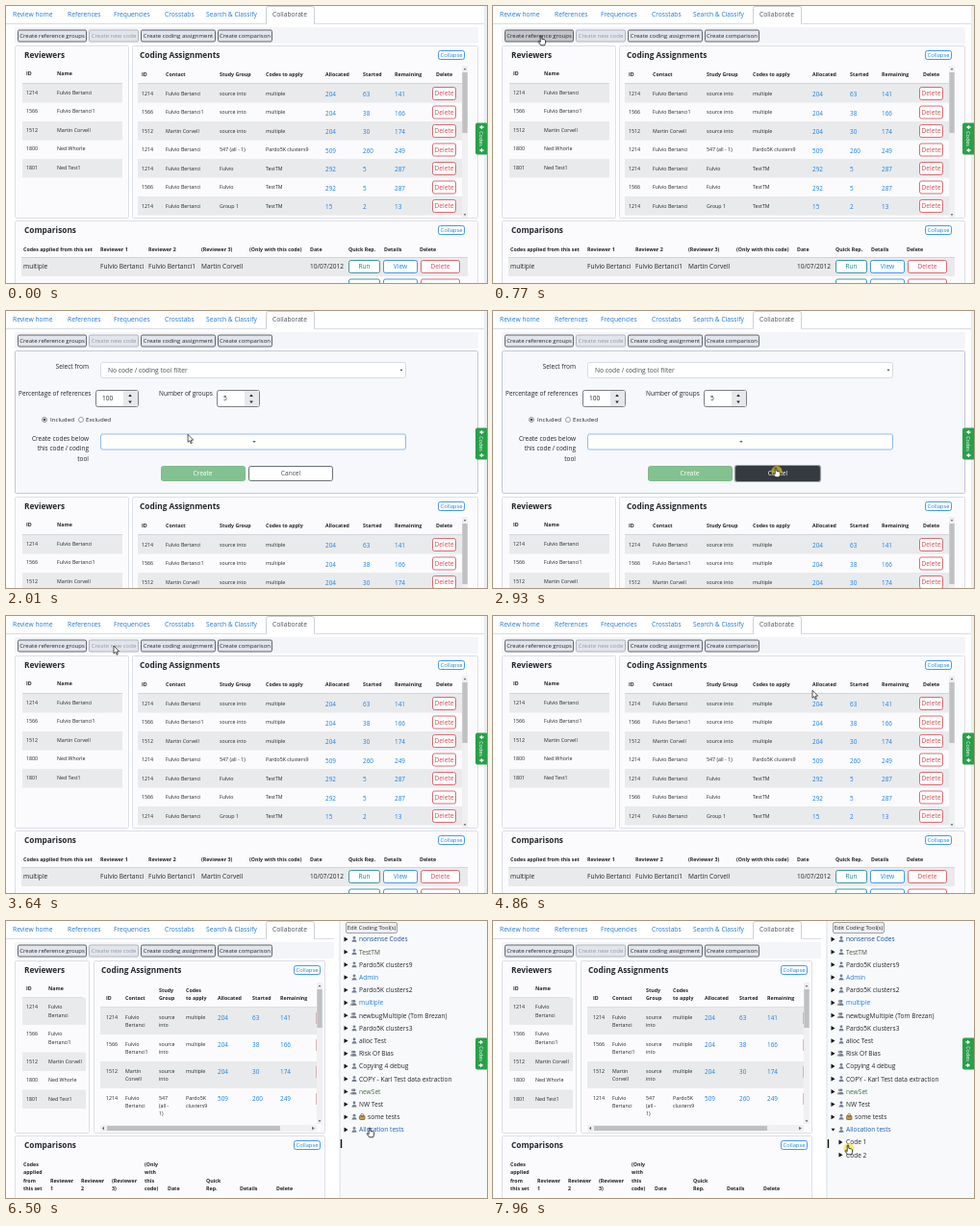
Recreate the animation shown at these times as an HTML page with a canvas. Size 500x288 px, loop 8000 ms.

```html
<!DOCTYPE html>
<html lang="en">
<head>
<meta charset="utf-8">
<title>Collaborate</title>
<style>
html, body { margin: 0; width: 100%; height: 100%; overflow: hidden; background: #fff; }
canvas { display: block; width: 500px; height: 288px; }
</style>
</head>
<body>
<canvas id="stage"></canvas>
<script>
const W = 500, H = 288, LOOP = 8000;
const canvas = document.getElementById('stage');
const dpr = window.devicePixelRatio || 1;
canvas.width = W * dpr;
canvas.height = H * dpr;
const ctx = canvas.getContext('2d');

const FONT = '"Open Sans", "Noto Sans", sans-serif';
const INK = '#212529', BLUE = '#1a80e0', RED = '#d04a52', GREY = '#8b9096';
const LINE = '#d5d9e2', STRIPE = '#e9eaec', CARD = '#fbfbfd';
const ANN = 'Fulvio Bertanci', ANN1 = ANN + '1', BEN = 'Martin Corvell';
const FIRST = 'Fulvio', SOFT = 'Pardo5K clusters';

// ---------- helpers ----------
// y is the middle of the capitals
function txt(s, x, y, size = 6.6, color = INK, bold = false, align = 'left') {
  ctx.save();
  ctx.translate(x, y + size * 0.35);
  ctx.scale(0.1, 0.1);
  ctx.font = `${bold ? 700 : 400} ${size * 10}px ${FONT}`;
  ctx.textAlign = align;
  ctx.fillStyle = color;
  ctx.fillText(s, 0, 0);
  ctx.restore();
}

function lines(s, x, y, gap, ...style) {
  s.split('\n').forEach((part, i) => txt(part, x, y + i * gap, ...style));
}

function rect(x, y, w, h, fill) {
  ctx.fillStyle = fill;
  ctx.fillRect(x, y, w, h);
}

function box(x, y, w, h, fill, stroke, r = 0, lw = 0.8) {
  ctx.beginPath();
  ctx.roundRect(x + 0.5, y + 0.5, w - 1, h - 1, r);
  if (fill) { ctx.fillStyle = fill; ctx.fill(); }
  if (stroke) { ctx.strokeStyle = stroke; ctx.lineWidth = lw; ctx.stroke(); }
}

function poly(points, fill, stroke, lw = 0.8) {
  ctx.beginPath();
  points.forEach(([x, y]) => ctx.lineTo(x, y));
  ctx.closePath();
  if (fill) { ctx.fillStyle = fill; ctx.fill(); }
  if (stroke) { ctx.strokeStyle = stroke; ctx.lineWidth = lw; ctx.lineJoin = 'round'; ctx.stroke(); }
}

function disc(x, y, r, fill, stroke) {
  ctx.beginPath();
  ctx.arc(x, y, r, 0, Math.PI * 2);
  if (fill) { ctx.fillStyle = fill; ctx.fill(); }
  if (stroke) { ctx.strokeStyle = stroke; ctx.lineWidth = 0.7; ctx.stroke(); }
}

function button(s, x, y, w, h, color, size = 6.6) {
  box(x, y, w, h, '#fff', color, 2);
  txt(s, x + w / 2, y + h / 2, size, color, false, 'center');
}

function arrow(x, y, r, dir, color) {
  if (dir === 'right') poly([[x - r, y - r * 1.2], [x + r, y], [x - r, y + r * 1.2]], color);
  else {
    const d = dir === 'up' ? -1 : 1;
    poly([[x - r, y - d * r * 0.6], [x + r, y - d * r * 0.6], [x, y + d * r * 0.8]], color);
  }
}

const between = (t, a, b) => t >= a && t < b;
const clamp = v => Math.max(0, Math.min(1, v));

// ---------- page head ----------
function header(t) {
  const tabs = [['Review home', 7], ['References', 64], ['Frequencies', 112], ['Crosstabs', 165], ['Search & Classify', 208]];
  rect(0, 18, 497, 0.8, '#cfd4da');
  tabs.forEach(([s, x]) => txt(s, x, 9, 6.7, '#1d78cf'));
  box(270, 0, 51, 23, '#fff', '#bfc5cc', 2);
  rect(269, 18.8, 53, 6, '#fff');
  txt('Collaborate', 277, 9, 6.7, '#495057');

  rect(9, 22, t >= 5330 ? 332 : 482, 17, '#f4f5f8');
  const hover = between(t, 530, 1860);
  const tools = [['Create reference groups', 12, 72], ['Create new code', 86, 52], ['Create coding assignment', 140, 78], ['Create comparison', 220, 57]];
  tools.forEach(([s, x, w], i) => {
    const off = i === 1;
    box(x, 24.5, w, 13, i === 0 && hover ? '#c3c5ca' : '#e3e5ed', off ? '#a4a8af' : '#41464d', 1.5);
    txt(s, x + w / 2, 31, 6, off ? '#9297a0' : INK, false, 'center');
  });
}

function card(x, y, w, h, title, tx) {
  box(x, y, w, h, CARD, LINE, 1);
  txt(title, tx, y + 10, 8.3, INK, true);
}

const collapse = (x, y) => button('Collapse', x, y, 28, 10, BLUE, 5.8);

function scrollY(x, y, h, thumb) {
  rect(x, y, 6, h, '#f0f0f1');
  arrow(x + 3, y + 3.5, 1.4, 'up', '#555');
  arrow(x + 3, y + h - 3, 1.4, 'down', '#555');
  rect(x + 0.3, y + 7, 5.4, thumb, '#bfc0c2');
}

// ---------- wide tables ----------
const people = [['1214', ANN], ['1566', ANN1], ['1512', BEN], ['1800', 'Ned Whorle'], ['1801', 'Ned Test1']];
const jobs = [
  ['1214', ANN, 'source into', 'multiple', 204, 63, 141],
  ['1566', ANN1, 'source into', 'multiple', 204, 38, 166],
  ['1512', BEN, 'source into', 'multiple', 204, 30, 174],
  ['1214', ANN, '547 (all - 1)', SOFT + '9', 509, 260, 249],
  ['1214', ANN, FIRST, 'TestTM', 292, 5, 287],
  ['1566', ANN, FIRST, 'TestTM', 292, 5, 287],
  ['1214', ANN, 'Group 1', 'TestTM', 15, 2, 13]
];
const heads = ['ID', 'Contact', 'Study Group', 'Codes to apply', 'Allocated', 'Started', 'Remaining', 'Delete'];

function wideTables() {
  const row = 19.5, top = 81;
  card(9, 41, 119, 180, 'Reviewers', 19);
  txt('ID', 21, 70, 5.3, INK, true);
  txt('Name', 53, 70, 5.3, INK, true);
  rect(17, 80, 104, 0.9, '#cfd3d9');
  people.forEach(([id, name], i) => {
    if (i % 2 === 0) rect(17, top + i * row, 104, row, STRIPE);
    txt(id, 21, 90 + i * row, 5.3);
    txt(name, 53, 90 + i * row, 5.3);
  });

  card(131, 41, 360, 180, 'Coding Assignments', 139);
  collapse(449, 46);
  const cols = [141, 166, 222, 270, 332, 371, 404, 447];
  heads.forEach((s, i) => txt(s, cols[i], 71, 5.3, INK, true));
  rect(137, 80, 337, 0.9, '#cfd3d9');
  jobs.forEach((job, r) => {
    const y = 91 + r * row;
    if (r % 2 === 0) rect(137, top + r * row, 337, row, STRIPE);
    job.forEach((v, c) => txt(String(v), cols[c], y + (c > 3 ? 1.2 : 0), c > 3 ? 6.4 : 5.3, c > 3 ? BLUE : INK));
    button('Delete', 443, y - 7, 25, 14, RED);
  });
  scrollY(474, 62, 158, 63);
}

function wideComparisons() {
  card(9, 223, 482, 90, 'Comparisons', 19);
  collapse(449, 228);
  const cols = [['Codes applied from this set', 18], ['Reviewer 1', 98], ['Reviewer 2', 148], ['(Reviewer 3)', 203],
    ['(Only with this code)', 253], ['Date', 316], ['Quick Rep.', 356], ['Details', 393], ['Delete', 430]];
  cols.forEach(([s, x]) => txt(s, x, 253, 5.3, INK, true));
  rect(16, 261, 464, 0.9, '#cfd3d9');
  rect(16, 262, 464, 19, STRIPE);
  [['multiple', 18], [ANN, 98], [ANN1, 148], [BEN, 203], ['10/07/2012', 316]].forEach(([s, x]) => {
    txt(s, x, 271, 6.6);
    txt(s, x, 290.5, 6.6);
  });
  [264, 283.5].forEach(y => {
    button('Run', 356, y, 33, 14, '#14808a');
    button('View', 392, y, 36, 14, BLUE);
    button('Delete', 431, y, 41, 14, RED);
  });
}

// ---------- form ----------
function field(label, lx, x, value) {
  txt(label, lx, 86, 6.5);
  box(x, 82, 45, 18, '#fff', '#5a6068', 2);
  txt(value, x + 7, 91, 6.6);
  rect(x + 29, 83, 15, 16, '#e6e8eb');
  arrow(x + 36, 88, 1.8, 'up', '#222');
  arrow(x + 36, 94.5, 1.8, 'down', '#222');
}

function form(t) {
  box(9, 41, 482, 149, '#f6f8fb', '#b4bccb', 1);
  txt('Select from', 86, 58, 6.5, INK, false, 'right');
  box(98, 53, 318, 17, '#fff', between(t, 1860, 2010) ? '#8fbdf0' : '#ced4da', 2);
  txt('No code / coding tool filter', 106, 61.5, 6.7, '#495057');
  arrow(411, 61.5, 1.4, 'down', '#333');

  field('Percentage of references', 13, 93, '100');
  field('Number of groups', 159, 219, '5');

  disc(40, 113, 2.5, '#fff', '#666');
  disc(40, 113, 1.3, '#444');
  txt('Included', 46, 113, 6.2);
  disc(78, 113, 2.5, '#fff', '#777');
  txt('Excluded', 83, 113, 6.2);

  lines('Create codes below\nthis code / coding\ntool', 86, 133, 10.2, 6.5, INK, false, 'right');
  box(98, 127.5, 318, 17, '#fff', '#74abe2', 2);
  arrow(258, 136, 1.6, 'down', '#2d6fb5');

  box(161, 161, 88, 16, '#83c28f', '#6fae7b', 2);
  txt('Create', 204.5, 169, 6.6, '#fff', false, 'center');
  button('Cancel', 252, 161, 88, 16, '#4a5057');
  ctx.save();
  ctx.globalAlpha = clamp((t - 2400) / 150);
  box(251, 160, 90, 18, '#343a40', '#9a9ea3', 2.5, 1.2);
  txt('Cancel', 296, 169, 6.6, '#fff', false, 'center');
  ctx.restore();
}

// ---------- narrow tables ----------
function narrowTables() {
  const twoLine = s => s.replace(' ', '\n');
  card(9, 41, 78, 180, 'Reviewers', 19);
  txt('ID', 21, 70, 5.3, INK, true);
  txt('Name', 44, 70, 5.3, INK, true);
  rect(17, 79.3, 63, 0.9, '#cfd3d9');
  const tops = [80, 108, 136.5, 156, 175.5, 195];
  people.forEach(([id, name], i) => {
    const y = tops[i];
    if (i % 2 === 0) rect(17, y, 66, tops[i + 1] - y, STRIPE);
    txt(id, 21, y + 9.5, 5.3);
    lines(i < 2 ? twoLine(name) : name, 44, y + 9.5, 8.4, 5.3);
  });

  card(91, 41, 241, 180, 'Coding Assignments', 99);
  collapse(299, 46);
  const cols = [104, 124, 159, 187, 220, 256, 285];
  cols.forEach((x, i) => {
    const two = i === 2 || i === 3;
    lines(two ? twoLine(heads[i]) : heads[i], x, two ? 72 : 80, 8, 5.3, INK, true);
  });
  rect(98, 89.3, 225, 0.9, '#cfd3d9');
  jobs.slice(0, 4).forEach((job, r) => {
    const y = 90 + r * 28;
    if (r % 2 === 0) rect(98, y, 225, 28, STRIPE);
    job.forEach((v, c) => {
      let s = String(v);
      if (c === 2 && r === 3) s = '547\n(all -\n1)';
      else if (c > 0 && c < 4) s = twoLine(s);
      lines(s, cols[c], y + (c > 3 ? 10.5 : 9.7), 8.2, c > 3 ? 6.4 : 5.3, c > 3 ? BLUE : INK);
    });
    rect(322, y + 5, 0.8, 12, '#d9a2a6');
  });
  scrollY(323, 64, 147, 40);
  rect(98, 212, 225, 7, '#f0f0f1');
  rect(105, 213, 180, 5, '#bfc0c2');
  poly([[102, 213.5], [102, 217.5], [100, 215.5]], '#666');
  arrow(319.5, 215.5, 1.4, 'right', '#666');

  card(9, 223, 323, 90, 'Comparisons', 19);
  collapse(299, 228);
  const comp = [['Codes\napplied\nfrom\nthis set', 18], ['Reviewer\n1', 46], ['Reviewer\n2', 78], ['(Reviewer\n3)', 110],
    ['(Only\nwith\nthis\ncode)', 144], ['Date', 168], ['Quick\nRep.', 208], ['Details', 243], ['Delete', 281]];
  comp.forEach(([s, x]) => lines(s, x, 278.5 - (s.split('\n').length - 1) * 8.5, 8.5, 5.3, INK, true));
}

// ---------- code tree ----------
const tree = [
  ['nonsense Codes', '#1d4d8f'], ['TestTM', '#4a5238'], [SOFT + '9'], ['Admin', BLUE], [SOFT + '2'],
  ['multiple', BLUE, 2], ['newbugMultiple (Tom Brezan)', INK, 2], [SOFT + '3'], ['alloc Test'],
  ['Risk Of Bias', INK, 2], ['Copying 4 debug'], ['COPY - Karl Test data extraction'],
  ['newSet', '#3b7440', 2], ['NW Test'], ['some tests'], ['Allocation tests', BLUE]
];

function person(x, y, color) {
  disc(x, y - 1.6, 1.4, color);
  ctx.beginPath();
  ctx.arc(x, y + 2.8, 2.5, Math.PI, 0);
  ctx.fill();
}

function sidebar(t) {
  const open = t >= 7280;
  rect(341, 0, 159, H, '#fff');
  rect(347, 0, 153, H, '#f8f9fb');
  rect(346.6, 0, 0.8, H, '#d3d7de');
  box(353, 1, 54, 12, '#eeeff1', '#8a8f96', 1.5);
  txt('Edit Coding Tool(s)', 380, 7, 5.9, INK, false, 'center');
  tree.forEach(([s, color = INK, heads = 1], i) => {
    const y = 19 + i * 13.2, last = i === tree.length - 1, boxed = s === 'some tests';
    arrow(353.5, y, 2, last && open ? 'down' : 'right', '#111');
    if (heads === 2) person(360.2, y, '#a59a9a');
    person(362, y, '#6f7d92');
    if (boxed) {
      box(367, y - 1.8, 6.5, 5, '#c79b4d', '#7d6231', 0.8);
      disc(370.2, y - 1.8, 1.6, null, '#7d6231');
    }
    txt(s, boxed ? 376 : 367, y, 6.6, last && t >= 6500 ? '#1a5fb4' : color);
  });
  if (open) ['Code 1', 'Code 2'].forEach((s, i) => {
    arrow(361.5, 230 + i * 13.2, 2, 'right', '#111');
    txt(s, 367, 230 + i * 13.2, 6.6);
  });
  rect(347.8, 227, 1.4, 9, '#111');
}

function codesTab(t) {
  const hover = between(t, 4950, 5720);
  box(487.5, 121, 14, 34, hover ? '#1e7e34' : '#28a04a', null, 2);
  ctx.save();
  ctx.translate(494, 138);
  ctx.rotate(Math.PI / 2);
  txt('Codes', 0, 0, 5.4, '#fff', false, 'center');
  const dir = t >= 5330 ? -1 : 1;
  [-12, 12].forEach(x => {
    poly([[x - 2.2, dir], [x + 2.2, dir], [x, -dir * 2.2]].map(([a, b]) => [a, b * -1]), '#fff');
    rect(x - 0.7, dir > 0 ? -2.6 : 0.4, 1.4, 2.2, '#fff');
  });
  ctx.restore();
}

// ---------- pointer ----------
// start, end, steps, path
const moves = [
  [70, 610, 8, [[420, 300], [300, 190], [120, 70], [50, 31]]],
  [1780, 2090, 5, [[50, 31], [150, 105], [282, 184]]],
  [2240, 2550, 5, [[282, 184], [294, 163]]],
  [3010, 3640, 9, [[294, 163], [200, 92], [112, 31]]],
  [4480, 5100, 9, [[112, 31], [300, 64], [493, 144]]],
  [5640, 6420, 11, [[493, 144], [440, 70], [392, 43], [362, 90], [366, 150], [371, 202]]],
  [6500, 6820, 5, [[378, 215], [364, 217], [350, 218]]],
  [7580, 7885, 5, [[350, 218], [369, 233]]]
];
const clicks = [[1080, 1240], [2860, 3010], [5180, 5330], [6970, 7120], [7955, 8000]];
const hands = [[770, 1860], [2400, 3080], [4950, 5720], [6500, 8000]];

function pointerAt(t) {
  const move = moves.filter(m => t >= m[0]).pop();
  if (!move) return null;
  const [start, end, n, path] = move;
  const step = Math.min(n, Math.floor((t - start) / ((end - start) / (n - 1)) + 0.01) + 1);
  // the tree visit begins with the pointer already on the row
  const q = start === 6500 ? (step - 1) / (n - 1) : step / n;
  const p = q * q * (3 - 2 * q) * (path.length - 1);
  const i = Math.min(path.length - 2, Math.floor(p)), f = p - i;
  return [0, 1].map(k => path[i][k] + (path[i + 1][k] - path[i][k]) * f);
}

function pointer(t) {
  const at = pointerAt(t);
  if (!at) return;
  const active = list => list.some(([a, b]) => between(t, a, b));
  ctx.save();
  ctx.translate(at[0], at[1]);
  if (active(clicks)) disc(1, 3.7, 5.6, 'rgba(250,225,20,0.6)');
  if (active(hands)) {
    poly([[-0.8, 0.2], [0.7, 0.2], [0.9, 3.4], [3.6, 4], [4.7, 5], [4.5, 7.6], [3.6, 9.8], [-0.3, 9.8],
      [-2.9, 6.3], [-2.4, 5.4], [-0.8, 6.6]], '#fff', '#111');
  } else {
    poly([[0, 0], [0, 8], [1.8, 6.4], [3.1, 9.3], [4.3, 8.8], [3.1, 6], [5.6, 5.8]], '#fff', '#111', 0.7);
  }
  ctx.restore();
}

// ---------- frame ----------
function draw(t) {
  ctx.setTransform(dpr, 0, 0, dpr, 0, 0);
  rect(0, 0, W, H, '#fff');
  header(t);
  if (t >= 5330) {
    narrowTables();
    sidebar(t);
  } else {
    rect(497, 0, 3, H, '#eceef0');
    if (between(t, 1240, 3010)) {
      form(t);
      ctx.save();
      ctx.translate(0, 152);
      wideTables();
      ctx.restore();
    } else {
      wideTables();
      wideComparisons();
    }
  }
  codesTab(t);
  pointer(t);
}

const began = performance.now();
function tick() {
  draw((performance.now() - began) % LOOP);
  requestAnimationFrame(tick);
}
tick();
</script>
</body>
</html>
```
